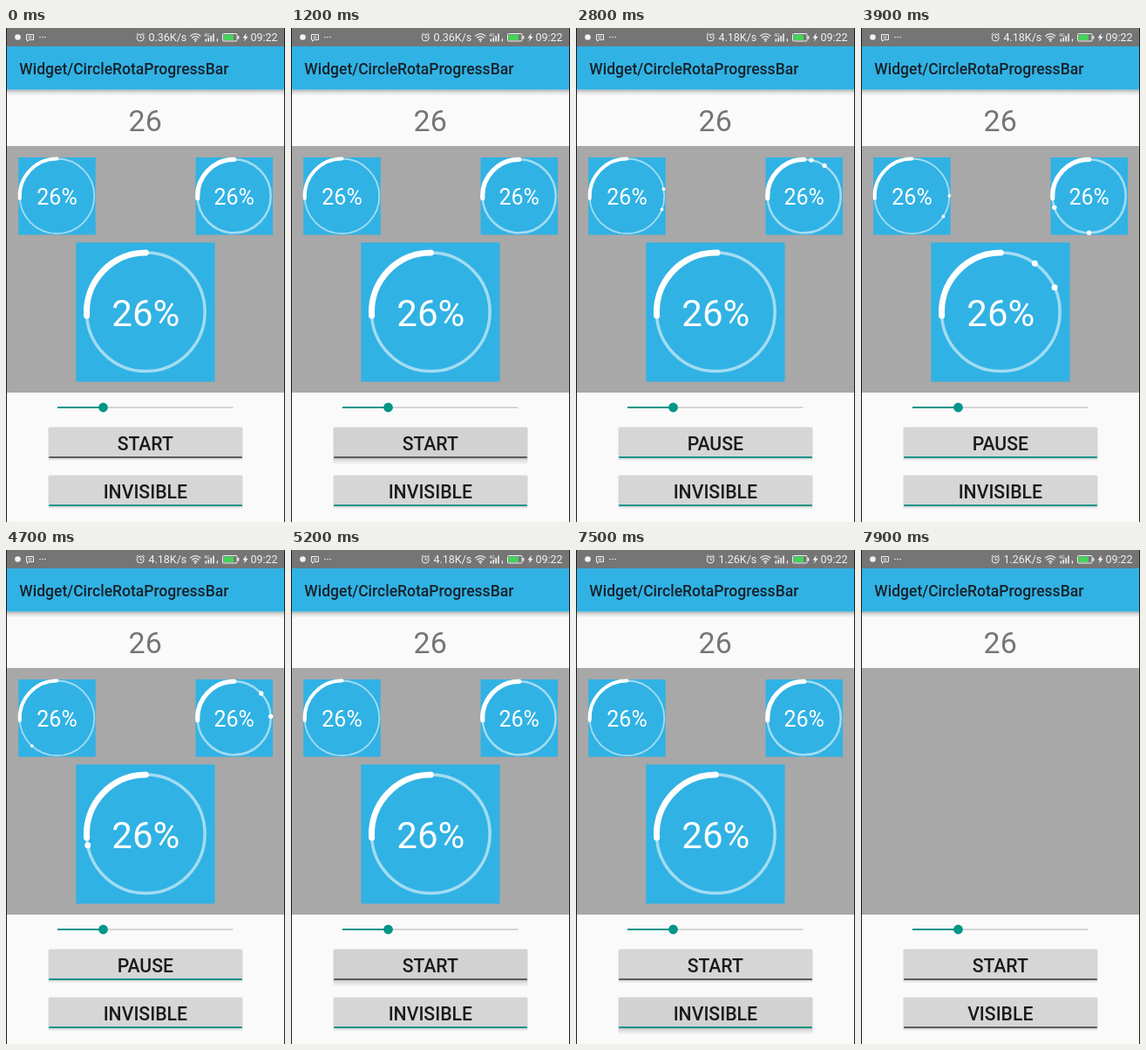
Animation of 320x565 px, one loop 8 s. Source, as an HTML page:

```html
<!DOCTYPE html>
<html lang="en">
<head>
<meta charset="utf-8">
<title>Circle progress</title>
<style>
  html, body { margin: 0; width: 100%; height: 100%; overflow: hidden; background: #fafafa; }
  svg { display: block; }
  text { font-family: Roboto, "Noto Sans", sans-serif; }
  .status { font-size: 12.5px; fill: #f2f2f2; }
  .mid { text-anchor: middle; }
  .label { font-size: 21.2px; font-weight: 500; fill: #1a1a1a; text-anchor: middle; }
</style>
</head>
<body>
<svg width="320" height="565" viewBox="0 0 320 565">
  <defs>
    <linearGradient id="shade" x2="0" y2="1">
      <stop offset="0" stop-opacity=".3"/>
      <stop offset=".4" stop-opacity=".12"/>
      <stop offset="1" stop-opacity="0"/>
    </linearGradient>
  </defs>

  <rect width="320" height="565" fill="#fafafa"/>
  <rect y="70.5" width="320" height="7" fill="url(#shade)"/>
  <rect y="21" width="320" height="49.5" fill="#31b2e4"/>
  <rect width="320" height="21" fill="#757575"/>

  <!-- status bar -->
  <g fill="#f2f2f2">
    <circle cx="13.5" cy="10.5" r="3.3"/>
    <path d="M23.5 7.5h8v6h-5l-2 1.6v-1.6h-1z" fill="none" stroke="#f2f2f2"/>
    <path d="M25.5 9.7h4M25.5 11.5h4" stroke="#f2f2f2" stroke-width=".8"/>
    <circle cx="39" cy="10.5" r=".8"/><circle cx="42" cy="10.5" r=".8"/><circle cx="45" cy="10.5" r=".8"/>
    <g fill="none" stroke="#f2f2f2">
      <circle cx="154.2" cy="11" r="4"/>
      <path d="M154.2 8.5v2.7h2M149.6 7.6l2-1.8M158.8 7.6l-2-1.8"/>
      <path d="M211.3 9.3q6-5.2 12 0M213.2 11.5q4.1-3.6 8.2 0M215.2 13.5q2.1-1.8 4.2 0" stroke-width="1.2"/>
    </g>
    <circle cx="217.3" cy="15" r="1"/>
    <text x="227" y="9.8" font-size="5.5">4G</text>
    <path d="M228.5 15.5v-3h1.6v3zM231.4 15.5v-4.5h1.6v4.5zM234.3 15.5v-6.5h1.6v6.5zM237.2 15.5v-9h1.6v9zM241.8 15.5v-3.2h1.2v3.2z"/>
    <rect x="248.5" y="6.5" width="16.5" height="8.5" rx="1" fill="none" stroke="#f2f2f2"/>
    <rect x="265.6" y="9" width="1.7" height="3.6"/>
    <rect x="249.5" y="7.5" width="11.5" height="6.5" fill="#46d35a"/>
    <path d="M275.8 5.8l-4.3 5.6h2.6l-1.2 4.2 4.8-5.8h-2.8z"/>
  </g>
  <text class="status" id="speed" x="163.5" y="15.3"></text>
  <text class="status" x="280.5" y="15.3">09:22</text>

  <text x="15.3" y="52.6" font-size="17.5" font-weight="500" fill="#17222a">Widget/CircleRotaProgressBar</text>
  <text class="mid" x="159.7" y="118" font-size="34" fill="#757575">26</text>

  <rect y="135" width="320" height="282" fill="#a8a8a8"/>
  <g id="rings"></g>

  <path d="M111 434H260.5" stroke="#c9c9c9" stroke-width="1.6"/>
  <path d="M59 434H111" stroke="#0c958a" stroke-width="2"/>
  <circle cx="111.5" cy="434" r="5.4" fill="#009688"/>

  <g id="buttons"></g>
  <path d="M.5 0V565M319.5 0V565" stroke="#1c1c1c"/>
</svg>

<script>
const LOOP = 8000, STEP = 100, PERCENT = 26;
const SWEEP = 360 * (1 - PERCENT / 100);
const RUN_FROM = 1211, RUN_TO = 5100, RESTART = 34;
const HIDE_AT = 7600;

const $ = id => document.getElementById(id);

function add(parent, tag, attrs, text) {
  const el = document.createElementNS("http://www.w3.org/2000/svg", tag);
  for (const k in attrs) el.setAttribute(k, attrs[k]);
  if (text) el.textContent = text;
  return parent.appendChild(el);
}

// Degrees run clockwise from the top of the ring.
function polar(ring, deg) {
  const a = deg * Math.PI / 180;
  return [ring.cx + ring.r * Math.sin(a), ring.cy - ring.r * Math.cos(a)];
}

const rings = [
  { x: 14.2, y: 148, size: 88.5, cx: 58.5, cy: 192.3, r: 42.8, track: 1.8, bar: 4, dot: 1.9, font: 25, base: 202.2, time: 1000, lag: 100 },
  { x: 217.5, y: 148, size: 88.5, cx: 261.7, cy: 192.3, r: 42, track: 2.5, bar: 5.2, dot: 2.7, font: 25, base: 202.2, time: 2000, lag: 300 },
  { x: 80.3, y: 245.3, size: 159.2, cx: 160.3, cy: 324.7, r: 67.8, track: 3.5, bar: 7, dot: 3.5, font: 42, base: 341.3, time: 1500, lag: 200 }
];

for (const ring of rings) {
  const g = $("rings"), { x, y, size, cx, cy, r } = ring;
  add(g, "rect", { x, y, width: size, height: size, fill: "#31b2e4" });
  add(g, "circle", { cx, cy, r, fill: "none", stroke: "#fff", "stroke-opacity": .55, "stroke-width": ring.track });
  add(g, "path", {
    d: `M${polar(ring, 0)}A${r} ${r} 0 0 0 ${polar(ring, SWEEP)}`,
    fill: "none", stroke: "#fff", "stroke-width": ring.bar, "stroke-linecap": "round"
  });
  ring.dots = [0, 1].map(() => add(g, "circle", { r: ring.dot, fill: "#fff" }));
  add(g, "text", { x: cx, y: ring.base, class: "mid", "font-size": ring.font, fill: "#fff" }, PERCENT + "%");
}

function makeButton(y) {
  const g = $("buttons");
  return {
    shadow: add(g, "rect", { x: 48.5, y: y + 34, width: 223, rx: 2, fill: "url(#shade)" }),
    face: add(g, "rect", { x: 48.5, y, width: 223, height: 35.5, rx: 2 }),
    line: add(g, "rect", { x: 49, y: y + 33.4, width: 222, height: 2, rx: 1 }),
    label: add(g, "text", { x: 159.8, y: y + 26.4, class: "label" })
  };
}

function setButton(b, label, on, pressed) {
  b.label.textContent = label;
  b.line.setAttribute("fill", on ? "#129488" : "#5c5c5c");
  b.face.setAttribute("fill", pressed ? "#d2d2d2" : "#d6d6d6");
  b.shadow.setAttribute("height", pressed ? 9 : 5);
}

const play = makeButton(456.5), show = makeButton(511.5);
const within = (t, from, to) => t >= from && t < to;

function draw(t) {
  $("speed").textContent = (t < 2500 ? "0.36" : t < 6600 ? "4.18" : "1.26") + "K/s";

  const running = within(t, RUN_FROM, RUN_TO);
  for (const ring of rings) {
    const since = (t - RUN_FROM) % (ring.time + ring.lag + RESTART);
    ring.dots.forEach((dot, i) => {
      const u = (since - i * ring.lag) / ring.time;
      const live = running && u > 0 && u < 1;
      dot.setAttribute("visibility", live ? "inherit" : "hidden");
      if (!live) return;
      const [x, y] = polar(ring, SWEEP * (1 - u) ** 2);
      dot.setAttribute("cx", x);
      dot.setAttribute("cy", y);
    });
  }

  const hidden = t >= HIDE_AT;
  $("rings").setAttribute("visibility", hidden ? "hidden" : "visible");
  setButton(play, running ? "PAUSE" : "START", running, within(t, 1100, 1400) || within(t, 5000, 5300));
  setButton(show, hidden ? "VISIBLE" : "INVISIBLE", !hidden, within(t, 7500, 7700));
}

const start = performance.now();
function tick() {
  const t = (performance.now() - start) % LOOP;
  draw(Math.floor(t / STEP) * STEP);
  requestAnimationFrame(tick);
}
tick();
</script>
</body>
</html>
```
